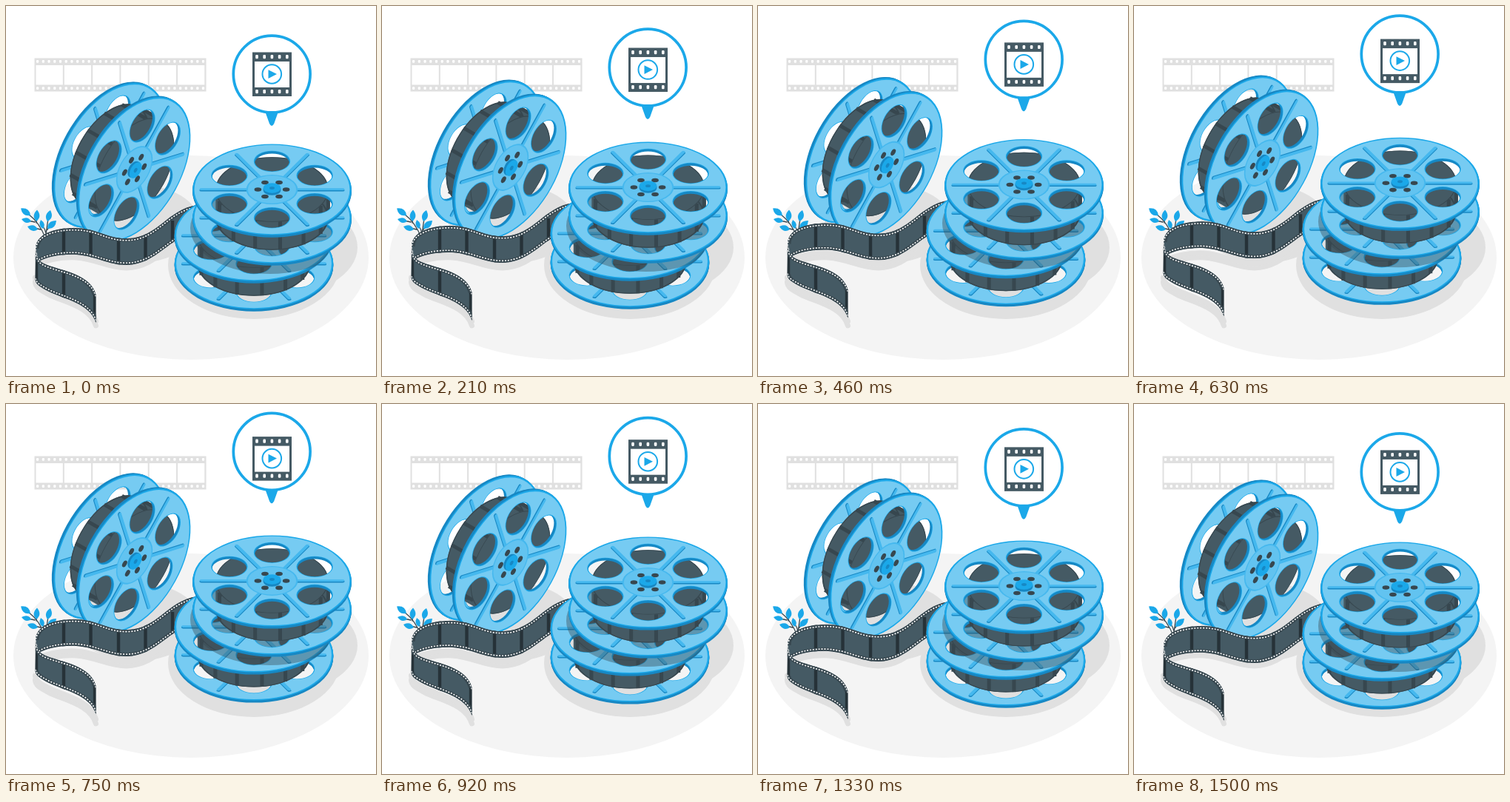
Animation of 500x500 px, one loop 1.54 s. Source, as an HTML page:

```html
<!DOCTYPE html>
<html lang="en">
<head>
<meta charset="utf-8">
<title>Film reels</title>
<style>
html, body { margin: 0; width: 100%; height: 100%; overflow: hidden; background: #fff; }
svg { display: block; width: 100vw; height: 100vh; }
</style>
</head>
<body>
<svg id="stage" viewBox="0 0 500 500"></svg>
<script>
const BLUE = '#1ba8e9', LIGHT = '#76cbf2', MID = '#45b8ee', DEEP = '#1788c4';
const SLATE = '#455a64', DARK = '#37474f', INK = '#263238', GREY = '#e0e0e0', FLOOR = '#f4f4f4';

const range = (n, f) => Array.from({ length: n }, (_, i) => f(i)).join('');
const polar = (r, deg) => [r * Math.cos(deg * Math.PI / 180), r * Math.sin(deg * Math.PI / 180)];
const circ = (x, y, r) => `M${x - r},${y}a${r},${r} 0 1 0 ${2 * r},0a${r},${r} 0 1 0 ${-2 * r},0z`;
const rect = (x, y, w, h, fill, rx = 0) =>
  `<rect x="${x}" y="${y}" width="${w}" height="${h}" rx="${rx}" fill="${fill}"/>`;
const oval = (x, y, rx, ry, fill, extra = '') =>
  `<ellipse cx="${x}" cy="${y}" rx="${rx}" ry="${ry}" fill="${fill}" ${extra}/>`;
const fill = (d, color) => `<path d="${d}" fill="${color}"/>`;
const line = (d, color, w, extra = '') =>
  `<path d="${d}" fill="none" stroke="${color}" stroke-width="${w}" ${extra}/>`;
const round = 'stroke-linecap="round" stroke-linejoin="round"';

// Each plane maps a wheel of radius 100 to the screen; back = plate thickness, gap = plate distance.
const flat = { m: [1.073, 0, 0, .615], turn: 0, back: [0, 3.2], gap: [0, 38] };
const upright = { m: [.759, -.438, 0, .876], turn: -47, back: [-2.8, -1.6], gap: [-33, -19] };

const place = (p, x, y, inner, turn = p.turn) =>
  `<g transform="matrix(${p.m},${x},${y}) rotate(${turn})">${inner}</g>`;

function plateShape(r, hole) {
  return circ(0, 0, r) + range(6, i => circ(...polar(62, 30 + 60 * i), hole));
}

function plate(p, x, y) {
  const [bx, by] = p.back;
  const at = (k, inner) => place(p, x + bx * k, y + by * k, inner);
  const solid = (r, hole, color) => `<path d="${plateShape(r, hole)}" fill="${color}" fill-rule="evenodd"/>`;
  const ribs = range(6, i => `M${polar(31, 60 * i)}L${polar(89, 60 * i)}`);
  return range(4, i => at(1 - i / 4, solid(100, 22, DEEP))) +
    at(0, solid(100, 22, BLUE) + solid(97.8, 23, LIGHT)) +
    at(.3, line(ribs, DEEP, 5, round)) +
    at(-.1, line(ribs, MID, 4.6, round)) +
    at(0, fill(circ(0, 0, 32.5), MID) + fill(circ(0, 0, 30.5), '#62c3f0') +
      range(6, i => fill(circ(...polar(17.8, 60 * i), 4.5), DARK))) +
    range(4, i => at(.3 - i * .3, fill(circ(0, 0, 11), i < 3 ? DEEP : BLUE))) +
    at(-.6, fill(circ(0, 0, 3.2), DEEP));
}

function spool(p, x, y) {
  const [a, b, c, d] = p.m, [dx, dy] = p.gap, r = 71;
  const det = a * d - b * c;
  const u = (d * dx - c * dy) / det, v = (a * dy - b * dx) / det, len = Math.hypot(u, v);
  const spot = (px, py, k) => [x + a * px + c * py + dx * k, y + b * px + d * py + dy * k];
  const s = [-v / len * r, u / len * r], t = [-s[0], -s[1]];
  const quad = `M${spot(...s, 0)}L${spot(...s, 1)}L${spot(...t, 1)}L${spot(...t, 0)}z`;
  const bands = range(14, i => {
    const q = polar(r, 360 / 14 * i + 4.6);
    return q[0] * u + q[1] * v > 0 ? `M${spot(...q, 0)}L${spot(...q, 1)}` : '';
  });
  const disc = fill(circ(0, 0, r), SLATE);
  return place(p, x + dx, y + dy, disc) + fill(quad, SLATE) + line(bands, DARK, 5) +
    place(p, x + dx, y + dy, line(circ(0, 0, r - 1), DARK, 2)) +
    place(p, x, y, disc + line(circ(0, 0, r - .6), DARK, 1.2));
}

function backdrop() {
  return oval(250, 340, 240, 138, FLOOR) +
    rect(38.5, 70.5, 232, 45, GREY) +
    range(6, i => rect(40.5 + 38.3 * i, 80, 36.3, 26.5, '#fff')) +
    range(30, i => [73, 109.2].map(y => rect(41 + 7.72 * i, y, 3.2, 3.8, '#fff', 1)).join(''));
}

const backTop = 'M40,328C40,308 65,300 92,300C125,300 135,315 165,314C205,313 218,275 258,269';
const backLow = 'M258,306C220,311 205,349 163,350C138,350 122,338 95,336C72,335 52,340 44,346';
const frontTop = 'M40,326C40,342 46,346 56,350C76,358 114,362 121.5,390';
const frontLow = 'M121.5,428C114,402 78,396 58,386C47,380 40,377 39.5,369';
const join = s => s.replace('M', 'L');

function ribbon(id, top, low, bars) {
  const shape = `${top}${join(low)}z`;
  const dots = (d, dy) => line(d, '#fff', 1.6, `stroke-dasharray="2 1.9" transform="translate(0 ${dy})"`);
  return `<clipPath id="${id}"><path d="${shape}"/></clipPath><g clip-path="url(#${id})">` +
    fill(shape, SLATE) +
    line(bars.map(x => `M${x},290V430`).join(''), INK, 4.4) +
    line(top + low, DARK, 9) + dots(top, 2.7) + dots(low, -2.7) + '</g>';
}

function shadows() {
  const trail = dy => line(frontLow + backLow, GREY, 7, `${round} transform="translate(0 ${dy})"`);
  return oval(176, 294, 86, 53, GREY) +
    oval(335, 350, 116, 73, GREY) + oval(359, 326, 116, 68, GREY) +
    oval(272, 364, 25, 17, FLOOR) + oval(399, 364, 25, 17, FLOOR) +
    trail(4) + trail(-2);
}

function leaf(x, y, tx, ty) {
  const dx = tx - x, dy = ty - y, w = .5;
  const side = k => `${x + dx * .45 - dy * w * k},${y + dy * .45 + dx * w * k}`;
  return fill(`M${x},${y}Q${side(1)} ${tx},${ty}Q${side(-1)} ${x},${y}z`, BLUE);
}

function plant() {
  const stems = 'M53,313C48,300 42,290 30,281M39,292L30,290M41,293L42,286M47,302L38,300' +
    'M53,313C55,305 55,298 57,288M55,303L62,295M54,307C53,302 51,299 49,296';
  return line(stems, DARK, 1.3, round) +
    leaf(33, 283, 20, 273.5) + leaf(34, 291, 21, 288) + leaf(41, 291, 42, 275.5) +
    leaf(43, 302, 29, 298) + leaf(56, 291, 60, 276) + leaf(56, 301, 68, 290) + leaf(50, 301, 47, 289);
}

function standingReel() {
  const x = 173.5, y = 221;
  return plate(upright, x - 33, y - 19) + spool(upright, x, y) + plate(upright, x, y);
}

function stack() {
  return plate(flat, 335, 348) + spool(flat, 335, 310) + plate(flat, 335, 310) +
    `<clipPath id="lid">${oval(335, 312, 107, 63, '#000')}</clipPath>` +
    oval(357, 300, 108, 62, DARK, 'opacity=".4" clip-path="url(#lid)"') +
    plate(flat, 359.5, 286) + spool(flat, 359.5, 248) + plate(flat, 359.5, 248);
}

function bubble() {
  return fill('M348.5,138L356,159Q359,165 362.2,159L369.7,138z', BLUE) +
    `<circle cx="359.2" cy="92" r="51.9" fill="#fff" stroke="${BLUE}" stroke-width="3.7"/>`;
}

function icon() {
  return rect(333, 62.5, 53, 59.5, SLATE) + rect(336, 75, 47, 35, '#fff') +
    range(5, i => [66, 113].map(y => rect(337.2 + 10.2 * i, y, 3.6, 5.2, '#fff', 1.3)).join('')) +
    `<circle cx="359.3" cy="92" r="12.8" fill="none" stroke="${BLUE}" stroke-width="2"/>` +
    fill('M354.5,86.2V98L366,92z', BLUE);
}

const stage = document.getElementById('stage');
const group = (id, inner) => `<g id="${id}">${inner}</g>`;
stage.innerHTML = backdrop() + shadows() + plant() +
  group('reels', standingReel() +
    ribbon('rear', backTop, backLow, [78, 114.5, 152, 188.5, 225]) +
    ribbon('fore', frontTop, frontLow, [41, 78, 120]) +
    stack()) +
  group('bubble', bubble()) + group('icon', icon());

const LOOP = 1540, STEPS = 37;
const floats = Object.entries({ reels: 9.8, bubble: 29.8, icon: 19.8 })
  .map(([id, height]) => [document.getElementById(id), height]);

// Rises quickly, sinks a little slower, in 24 steps per second.
function draw(ms) {
  const n = Math.min(STEPS - 1, Math.floor(ms % LOOP * STEPS / LOOP + .08));
  const lift = n < 16.6 ? n / 16.6 : (36.1 - n) / 19.5;
  for (const [node, height] of floats) node.setAttribute('transform', `translate(0 ${-height * lift})`);
}

const start = performance.now();
function tick(now) {
  draw(Math.max(0, now - start));
  requestAnimationFrame(tick);
}
draw(0);
requestAnimationFrame(tick);
</script>
</body>
</html>
```
